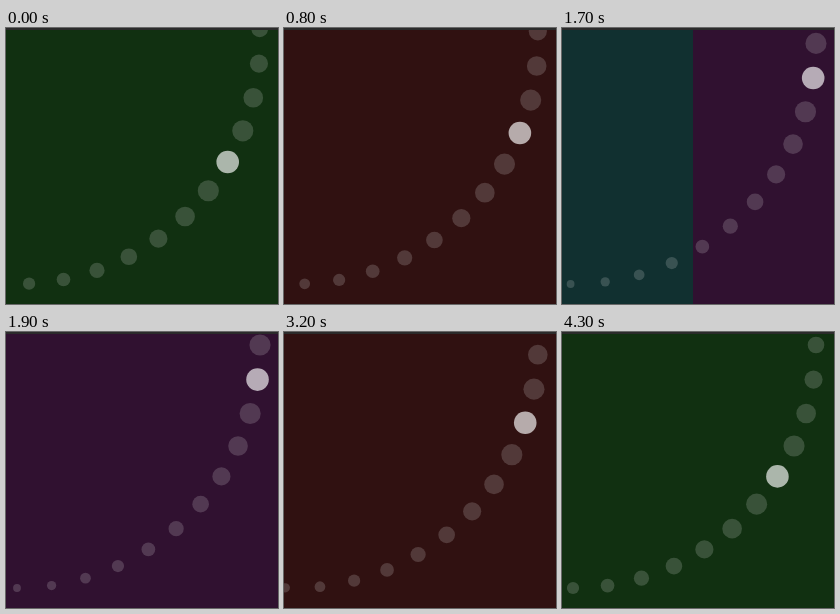
An HTML page with a canvas for the animation above (4.8 s loop, 272x276 px).

```html
<!DOCTYPE html>
<html lang="en">
<head>
<meta charset="utf-8">
<title>Dial slider</title>
<style>
  html, body { margin: 0; width: 100%; height: 100%; overflow: hidden; background: #2b2b2b; }
  canvas { display: block; }
</style>
</head>
<body>
<canvas id="stage" width="272" height="276"></canvas>
<script>
const ctx = document.getElementById('stage').getContext('2d');
const W = 272, H = 276, TOP = 2;
const LOOP = 4800, TURN = 800, TICK = 100;
const PAGE = 1900;                       // slide width; the stage shows its left part
const CX = 11, CY = 13, R = 243;
const GAP = Math.PI * 2 / 44;
const COLORS = ['#113011', '#301111', '#113030', '#301130'];
const ORDER = [0, 1, 2, 3, 2, 1, 0];     // slides visited in one loop

function easeInOutExpo(p) {
  if (p >= 1) return 1;
  return p < 0.5 ? 2 ** (20 * p - 10) / 2 : 1 - 2 ** (10 - 20 * p) / 2;
}

function fill(color, x, w) {
  ctx.fillStyle = color;
  ctx.fillRect(x, TOP, w, H - TOP);
}

function drawSlides(from, to, e) {
  const forward = to > from;
  const edge = Math.round(PAGE * (forward ? 1 - e : e));
  fill(COLORS[forward ? from : to], 0, W);
  if (edge < W) fill(COLORS[forward ? to : from], edge, W - edge);
}

function drawDots(pos) {
  const lead = (4 - pos) * GAP;
  for (let i = -6; i <= 12; i++) {
    const a = lead + i * GAP;
    ctx.fillStyle = `rgba(255,255,255,${i ? 0.17 : 0.65})`;
    ctx.beginPath();
    ctx.arc(CX + R * Math.cos(a), CY + R * Math.sin(a), 11.3 - 0.74 * Math.abs(i), 0, Math.PI * 2);
    ctx.fill();
  }
}

function draw(time) {
  const t = time % LOOP;
  const turn = Math.floor(t / TURN);
  const step = Math.min(3, Math.floor((t % TURN) / TICK));
  const e = easeInOutExpo((turn ? 0.458 : 0.474) + 0.185 * step);
  const from = ORDER[turn], to = ORDER[turn + 1];

  ctx.fillStyle = '#2b2b2b';
  ctx.fillRect(0, 0, W, TOP);
  ctx.save();
  ctx.beginPath();
  ctx.rect(0, TOP, W, H - TOP);
  ctx.clip();
  drawSlides(from, to, e);
  drawDots(from + (to - from) * e);
  ctx.restore();
}

const start = performance.now();
function frame() {
  draw(performance.now() - start);
  requestAnimationFrame(frame);
}
frame();
</script>
</body>
</html>
```
